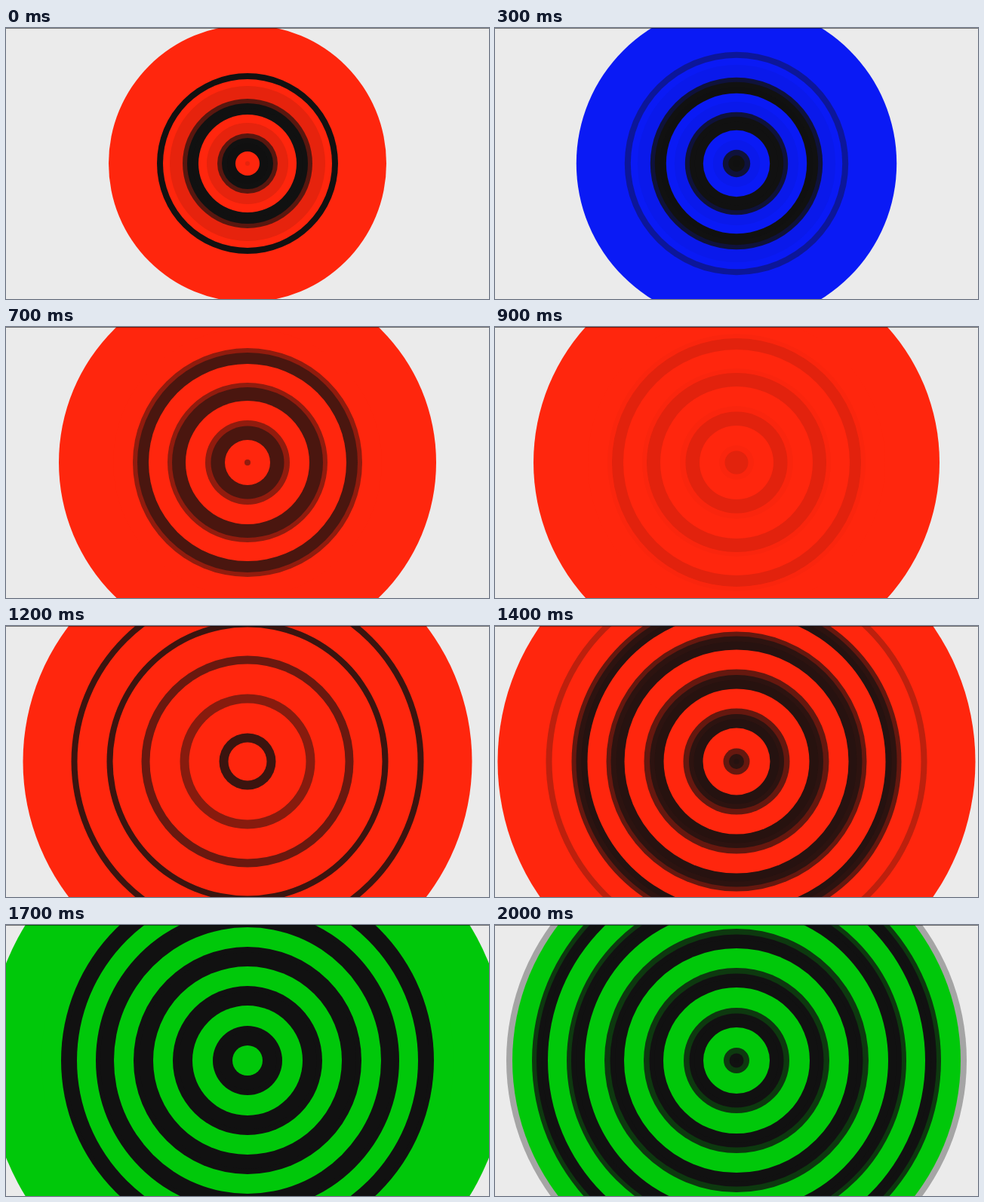
An HTML page with a canvas for the animation above (2100 ms loop, 640 px wide and 360 px high).

```html
<!DOCTYPE html>
<html>
<head>
<meta charset="utf-8">
<style>
html, body { margin: 0; width: 100%; height: 100%; overflow: hidden; background: #ebebeb; }
canvas { display: block; }
</style>
</head>
<body>
<canvas id="stage" width="640" height="360"></canvas>
<script>
const ctx = document.getElementById('stage').getContext('2d');
const STEP = 100, STEPS = 21;
const RED = '#ff260d', BLUE = '#0a1af5', GREEN = '#00c80a', BLACK = '#111';

// Each wave: start radius, then the reach of its black discs, widest first
const waves = [
  { start: 112, reach: [0, 0, 0, 8] },
  { start: 65, reach: [38, 21, 15, 8] },
  { start: 16, reach: [38, 24, 18, 11] },
  ...[-36, -88, -141, -194].map(start => ({ start, reach: [39, 26, 18.5, 12] }))
];
// Strength of the narrowest disc per wave
const gain = [1, 1, 0.76, 0.61, 1, 1, 1];

// Step, distance travelled, opacity of the four black discs
const keys = [
  [0, 0, 0.1, 0.66, 1, 1],
  [5, 47, 0, 0.9, 1, 0],
  [9, 85, 0, 0.02, 0.1, 0],
  [12, 113.5, 0, 0, 0, 0.82],
  [15, 142, 0, 0.96, 1, 0],
  [17, 161, 0, 1, 1, 0],
  [20, 185, 0, 0.78, 1, 0.32]
];

function pose(step) {
  const i = Math.max(1, keys.findIndex(k => k[0] >= step));
  const a = keys[i - 1], b = keys[i];
  const f = (step - a[0]) / (b[0] - a[0]);
  return a.map((v, n) => v + (b[n] - v) * f);
}

function colorAt(step) {
  if (step > 15) return GREEN;
  return step > 2 && step < 7 ? BLUE : RED;
}

function disc(r, color, alpha = 1) {
  if (r <= 0 || alpha <= 0) return;
  ctx.globalAlpha = alpha;
  ctx.fillStyle = color;
  ctx.beginPath();
  ctx.arc(320, 180, r, 0, Math.PI * 2);
  ctx.fill();
}

function draw(step) {
  const [, travel, ...levels] = pose(step);
  const color = colorAt(step);
  ctx.globalAlpha = 1;
  ctx.fillStyle = '#ebebeb';
  ctx.fillRect(0, 0, 640, 360);
  // The leading disc is dropped once it covers the corners
  if (184 + travel < 368) disc(184 + travel, color);
  waves.forEach(({ start, reach }, w) => {
    const r = start + travel;
    reach.forEach((d, n) => {
      if (d) disc(r + d, BLACK, levels[n] * (n === 3 ? gain[w] : 1));
    });
    disc(r, color);
  });
  ctx.globalAlpha = 0.5;
  ctx.fillStyle = '#000';
  ctx.fillRect(0, 0, 640, 1);
}

const begin = performance.now();
function tick() {
  draw(Math.floor((performance.now() - begin) / STEP) % STEPS);
  requestAnimationFrame(tick);
}
tick();
</script>
</body>
</html>
```
